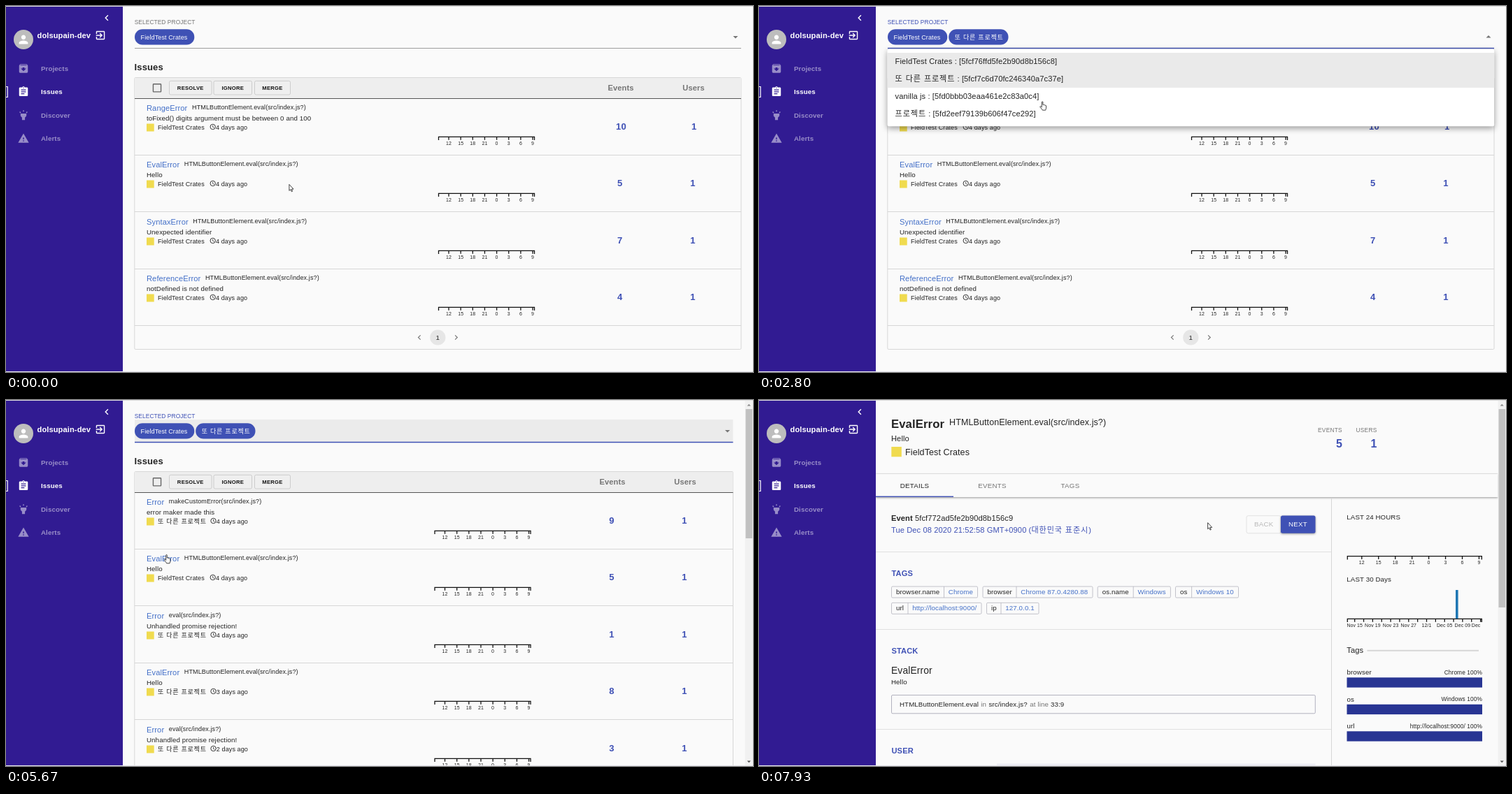
An HTML page that plays this animation: 1068 by 524 pixels, repeating every 8000 ms.

```html
<!DOCTYPE html>
<html lang="ko">
<head>
<meta charset="utf-8">
<title>Issue tracker</title>
<style>
html, body { margin: 0; width: 100%; height: 100%; overflow: hidden; background: #fafafa; }
svg { display: block; width: 1068px; height: 524px; }
text { font-family: "Liberation Sans", "Noto Sans CJK KR", Arial, sans-serif; letter-spacing: .1px; white-space: pre; }
.ko { letter-spacing: .08em; }
.b { font-weight: 700; }
.mid { text-anchor: middle; }
.end { text-anchor: end; }
.caps { letter-spacing: .26px; }
.url { font-family: "Open Sans", "Noto Sans", sans-serif; letter-spacing: 0; }
.bar { filter: drop-shadow(0 1.5px 1.5px rgba(0,0,0,.4)); }
.paper { filter: drop-shadow(0 3px 4px rgba(0,0,0,.38)); }
#menu { transform-origin: 617px 62px; }
</style>
</head>
<body>
<svg viewBox="0 0 1068 524"></svg>
<script>
const LOOP = 8000;
const INK = '#242424', BLUE = '#3f51b5', LINK = '#4470c8', GREY = '#757575', LINE = '#d6d6d6';
const PROJECT = 'FieldTest Crates', OTHER = '또 다른 프로젝트';
const EVAL = 'HTMLButtonElement.eval(src/index.js?)';
// Type sizes of a 1536 px page shown at 1068 px
const S = { tick: 6.95, xs: 8.34, sm: 9.04, md: 9.73, lg: 11.12, xl: 12.52, h3: 13.02, h6: 13.9, h5: 16.69 };

const korean = s => s.replace(/[가-힣][가-힣 ]*[가-힣]/g, m => `<tspan class="ko">${m}</tspan>`);
const text = (x, y, s, size, fill = INK, cls = '') =>
  `<text x="${x}" y="${y}" font-size="${size}" fill="${fill}" class="${cls}">${korean(String(s))}</text>`;
const rect = (x, y, x2, y2, fill, more = '') =>
  `<rect x="${x}" y="${y}" width="${x2 - x}" height="${y2 - y}" fill="${fill}" ${more}/>`;
const frame = (x, y, x2, y2, stroke, fill = 'none', rx = 1.5) =>
  rect(x, y, x2, y2, fill, `stroke="${stroke}" stroke-width=".8" rx="${rx}"`);
const line = (d, stroke = LINE, w = 1, more = '') =>
  `<path d="${d}" stroke="${stroke}" stroke-width="${w}" fill="none" ${more}/>`;
const group = (id, body) => `<g id="${id}">${body}</g>`;
const icon = (cx, cy, d, fill, s = .695) =>
  `<path transform="translate(${cx - 12 * s} ${cy - 12 * s}) scale(${s})" d="${d}" fill="${fill}"/>`;

const ICON = {
  left: 'M15.41 7.41L14 6l-6 6 6 6 1.41-1.41L10.83 12z',
  right: 'M10 6L8.59 7.41 13.17 12l-4.58 4.59L10 18l6-6z',
  down: 'M7 10l5 5 5-5z',
  up: 'M7 14l5-5 5 5z',
  person: 'M12 12c2.21 0 4-1.79 4-4s-1.79-4-4-4-4 1.79-4 4 1.79 4 4 4zm0 2c-2.67 0-8 1.34-8 4v2h16v-2c0-2.66-5.33-4-8-4z',
  exit: 'M10.09 15.59L11.5 17l5-5-5-5-1.41 1.41L12.67 11H3v2h9.67l-2.58 2.59zM19 3H5c-1.11 0-2 .9-2 2v4h2V5h14v14H5v-4H3v4c0 1.1.89 2 2 2h14c1.1 0 2-.9 2-2V5c0-1.1-.9-2-2-2z',
  box: 'M20.5 5.2l-1.4-1.7Q18.7 3 18 3H6q-.7 0-1.2.5L3.5 5.2Q3 5.7 3 6.5V19a2 2 0 0 0 2 2h14a2 2 0 0 0 2-2V6.5q0-.8-.5-1.3zM12 17.5L6.5 12H10v-2h4v2h3.5zM5.1 5l.8-1h12l1 1z',
  task: 'M19 3h-4.18C14.4 1.84 13.3 1 12 1c-1.3 0-2.4.84-2.82 2H5c-1.1 0-2 .9-2 2v14c0 1.1.9 2 2 2h14c1.1 0 2-.9 2-2V5c0-1.1-.9-2-2-2zm-7 0c.55 0 1 .45 1 1s-.45 1-1 1-1-.45-1-1 .45-1 1-1zm2 14H7v-2h7v2zm3-4H7v-2h10v2zm0-4H7V7h10v2z',
  torch: 'M6 14l3 3v5h6v-5l3-3V9H6zm5-12h2v3h-2zM3.5 5.9l1.4-1.4L7 6.6 5.6 8zm13.5.7l2.1-2.1 1.4 1.4L18.4 8z',
  alert: 'M1 21h22L12 2 1 21zm12-3h-2v-2h2v2zm0-4h-2v-4h2v4z',
  check: 'M19 5v14H5V5h14m0-2H5c-1.1 0-2 .9-2 2v14c0 1.1.9 2 2 2h14c1.1 0 2-.9 2-2V5c0-1.1-.9-2-2-2z'
};

function sidebar() {
  const items = [['Projects', 'box'], ['Issues', 'task'], ['Discover', 'torch'], ['Alerts', 'alert']];
  return rect(0, 1, 167, 523, '#311b92') +
    icon(144, 17, ICON.left, '#fff') +
    '<circle cx="25" cy="48" r="14" fill="#bdbdbd"/>' + icon(25, 48, ICON.person, '#fff', .8) +
    text(44.5, 46, 'dolsupain-dev', S.lg, '#fff', 'b') +
    icon(135, 42, ICON.exit, '#fff') +
    items.map(([name, key], i) => {
      const fill = i === 1 ? '#fff' : '#988dc8', y = 89.5 + i * 33.35;
      return icon(25, y, ICON[key], fill) + text(50, y + 3.5, name, S.md, fill, 'b');
    }).join('') +
    line('M0 115.5H2.2V130.5H0', '#fff', 1.2);
}

const chip = (x, s) => rect(x, 33.3, x + 85.3, 55.5, BLUE, 'rx="11.1"') + text(x + 8.6, 47.6, s, S.sm, '#fff');

// Horizontal scale bar with labelled ticks
function axis(x, x2, y, first, step, labels, gap = step) {
  let d = `M${x} ${y + 4.8}V${y}H${x2}V${y + 4.8}`;
  for (let t = first; t < x2; t += gap) d += `M${t} ${y}v4.4`;
  return line(d, '#111', 1.3) +
    labels.map((s, i) => text(first + i * step, y + 11.5, s, S.tick, INK, 'mid')).join('');
}
const HOURS = [12, 15, 18, 21, 0, 3, 6, 9];

function issueRow([name, src, message, project, days, events], i, wide) {
  const shift = wide ? 0 : -5.5;
  const extra = events > 9 ? 1.7 : 0;
  const cx = project === OTHER ? 296.5 : 295.7;
  const body =
    `<text x="201" y="150" font-size="${S.lg}" fill="${LINK}">${name}` +
    `<tspan dx="6.6" dy="-2" font-size="${S.sm}" fill="${INK}">${src}</tspan></text>` +
    text(201, 163.8, message, S.md) +
    rect(201, 168.5, 211.7, 179.5, '#f0db4f') +
    text(217, 177.3, project, S.sm) +
    `<circle cx="${cx}" cy="173" r="3.7" fill="none" stroke="${INK}" stroke-width=".9"/>` +
    line(`M${cx} 170.8V173.3L${cx + 1.8} 174.4`, INK, .8) +
    text(cx + 4.3, 177.3, days + ' days ago', S.sm) +
    axis(618.5 + shift, 755.5 + shift, 187.3, 633 + shift, 17.15, HOURS) +
    text((wide ? 877.7 : 866) + extra, 177.3, events, S.h3, BLUE, 'b mid') +
    text((wide ? 982 : 970) + extra, 177.3, 1, S.h3, BLUE, 'b mid') +
    line(`M184 213.5H${wide ? 1051 : 1039.5}`);
  return `<g transform="translate(0 ${Math.round(i * 81.4)})">${body}</g>`;
}

function issueList(rows, wide, bottom) {
  const x2 = wide ? 1051 : 1039.5;
  const button = (x, to, s) => frame(x, 107.3, to, 127, '#c4c4c4', '#efefef', 2) +
    text((x + to) / 2, 119.9, s, 7.65, '#111', 'b mid caps');
  return text(183.6, 91.6, 'Issues', S.h3, INK, 'b') +
    frame(183.8, 102.5, x2, bottom, '#cfcfcf') +
    rect(184, 103, x2, 132, '#eee') + line(`M184 132.5H${x2}`, '#555') +
    icon(216, 117.3, ICON.check, '#666') +
    button(233.5, 294, 'RESOLVE') + button(297, 351.5, 'IGNORE') + button(355.5, 406.5, 'MERGE') +
    text(wide ? 879 : 867, 121.2, 'Events', S.lg, GREY, 'b mid') +
    text(wide ? 983 : 971, 121.2, 'Users', S.lg, GREY, 'b mid') +
    rows.map((r, i) => issueRow(r, i, wide)).join('');
}

const before = [
  ['RangeError', EVAL, 'toFixed() digits argument must be between 0 and 100', PROJECT, 4, 10],
  ['EvalError', EVAL, 'Hello', PROJECT, 4, 5],
  ['SyntaxError', EVAL, 'Unexpected identifier', PROJECT, 4, 7],
  ['ReferenceError', EVAL, 'notDefined is not defined', PROJECT, 4, 4]
];
const after = [
  ['Error', 'makeCustomError(src/index.js?)', 'error maker made this', OTHER, 4, 9],
  before[1],
  ['Error', 'eval(src/index.js?)', 'Unhandled promise rejection!', OTHER, 4, 1],
  ['EvalError', EVAL, 'Hello', OTHER, 3, 8],
  ['Error', 'eval(src/index.js?)', 'Unhandled promise rejection!', OTHER, 2, 3]
];
const pager = icon(591, 474.5, ICON.left, '#777', .6) +
  '<circle cx="617.3" cy="474.5" r="11.1" fill="#e6e6e6"/>' + text(617.3, 478, 1, S.md, INK, 'mid') +
  icon(643.7, 474.5, ICON.right, '#777', .6);

function menu() {
  const items = [
    [PROJECT, '5fcf76ffd5fe2b90d8b156c8'], [OTHER, '5fcf7c6d70fc246340a7c37e'],
    ['vanilla js', '5fd0bbb03eaa461e2c83a0c4'], ['프로젝트', '5fd2eef79139b606f47ce292']
  ];
  return rect(183.5, 61.8, 1051.2, 172.3, '#fff', 'rx="2.5" class="paper"') +
    rect(183.5, 67, 1051.2, 92, '#eaeaea') +
    group('picked', rect(183.5, 92, 1051.2, 117, '#eaeaea')) +
    items.map(([name, key], i) => text(194.6, 82.8 + i * 25, `${name} : [${key}]`, S.lg)).join('');
}

function tag(x, y, name, split, end, value) {
  return frame(x, y, end, y + 16, '#b4b4be') + line(`M${split} ${y}v16`, '#b4b4be', .8) +
    text(x + 6.5, y + 11, name, S.md) + (value ? text(split + 6.3, y + 11, value, S.md, LINK) : '');
}

function detailHead() {
  const tab = (x, s, fill) => text(x, 125.5, s, S.md, fill, 'mid caps');
  return text(189, 39.8, 'EvalError', S.h5, INK, 'b') + text(272, 35.6, EVAL, S.xl) +
    text(189, 59.4, 'Hello', S.lg) +
    rect(189.3, 67, 203.8, 81.3, '#f0db4f') + text(209, 78.5, PROJECT, S.xl) +
    text(816.5, 45.6, 'EVENTS', S.xs, GREY, 'mid caps') + text(868.5, 45.6, 'USERS', S.xs, GREY, 'mid caps') +
    text(829.5, 67.7, 5, 16, BLUE, 'b mid') + text(879, 67.7, 1, 16, BLUE, 'b mid') +
    line('M167 105.5H1056', '#ebebeb') + rect(167, 106, 1056.5, 139, '#fafafa', 'class="bar"') +
    rect(167, 137.6, 278, 139, BLUE) +
    tab(222.5, 'DETAILS', INK) + tab(333.5, 'EVENTS', GREY) + tab(445, 'TAGS', GREY);
}

// Parts both detail states share; right edge of the main column is `edge`
function detailFrame(edge, splits, heads) {
  const x = edge - 121;
  return line(`M${edge}.5 140V524`) + splits.map(y => line(`M167 ${y}H${edge}`, '#e0e0e0')).join('') +
    text(189, 173.4, 'Event', S.lg, INK, 'b') +
    frame(x, 165.7, x + 49, 190.8, '#dcdcdc', 'none', 2.5) + text(x + 24.7, 181.3, 'BACK', S.md, '#b8b8b8', 'mid caps') +
    rect(x + 49, 165.5, x + 98.5, 190.8, BLUE, 'rx="2.5" class="bar"') + text(x + 73.5, 181.3, 'NEXT', S.md, '#fff', 'mid caps') +
    ['TAGS', 'STACK', 'USER'].map((s, i) => text(189.5, heads[i], s, S.lg, BLUE, 'b')).join('') +
    text(edge + 22.3, 171.3, 'LAST 24 HOURS', S.md) + text(edge + 22.3, 260, 'LAST 30 Days', S.md) +
    text(edge + 22.3, 362, 'Tags', S.lg) + line(`M${edge + 51.5} 358.7H1029`, '#d6d6d6', 2);
}

function detailEmpty() {
  const tags = [[189.5, 'browser.name', 264.5, 277.3], [284.5, 'browser', 333, 345.8], [353.2, 'os.name', 404, 416.3],
    [424, 'os', 447.5, 460.3], [467.5, 'url', 491.5, 504.3], [511.5, 'ip', 532.5, 545]];
  return detailFrame(778, [217.5, 305.5, 415, 503], [251.6, 339.4, 448.9]) +
    text(189, 190, 'Invalid Date', S.lg, BLUE) +
    tags.map(([x, s, split, end]) => tag(x, 267, s, split, end)).join('') +
    frame(189.5, 366, 755.2, 392.2, '#a0a0a0') +
    text(204.3, 382.5, 'in', S.md, GREY) + text(218.7, 382.5, 'at line', S.md, GREY) + text(248.7, 382.5, ':', S.md) +
    text(189, 476, 'IP Address', S.lg) + rect(330, 464, 755.5, 471, '#eeeef5');
}

function detailFull() {
  const share = (y, name, value) => text(840.5, y - 4, name, S.md) +
    text(1034, y - 4.8, value + ' 100%', S.xs, INK, 'end') + rect(840.5, y, 1034, y + 14.3, '#283593');
  return detailFrame(818, [217.5, 328.5, 471.5], [251.6, 362.8, 505.5]) +
    text(223, 173.4, '5fcf772ad5fe2b90d8b156c9', S.lg) +
    text(189, 190, 'Tue Dec 08 2020 21:52:58 GMT+0900 (대한민국 표준시)', S.lg, BLUE) +
    tag(189.5, 267, 'browser.name', 264.5, 312.5, 'Chrome') + tag(320, 267, 'browser', 368, 477, 'Chrome 87.0.4280.88') +
    tag(484.2, 267, 'os.name', 535.2, 588.4, 'Windows') + tag(595.5, 267, 'os', 618.6, 685.5, 'Windows 10') +
    tag(189.5, 290.3, 'url', 213, 318, 'http://localhost:9000/') + tag(325.5, 290.3, 'ip', 346, 400, '127.0.0.1') +
    text(189, 392, 'EvalError', S.h6) + text(189, 407.3, 'Hello', S.md) +
    frame(189.5, 422.5, 795.3, 448.8, '#a0a0b0') +
    text(201, 439, 'HTMLButtonElement.eval', S.md) + text(317.3, 439, 'in', S.md, GREY) +
    text(328.5, 439, 'src/index.js?', S.md) + text(387.3, 439, 'at line', S.md, GREY) + text(417, 439, '33:9', S.md) +
    rect(340, 520.5, 795.5, 524, '#eeeef5') +
    axis(841.3, 1033.3, 223.7, 861.8, 23.95, HOURS) +
    axis(841.3, 1033.3, 313.3, 851.7, 25.7, ['Nov 15', 'Nov 19', 'Nov 23', 'Nov 27', '12/1', 'Dec 05', 'Dec 09'], 12.85) +
    text(1018.8, 324.8, 'Dec', S.tick) + rect(996, 272, 999.6, 313, '#1f77b4') +
    share(397.3, 'browser', 'Chrome') + share(435.8, 'os', 'Windows') + share(474.3, 'url', 'http://localhost:9000/');
}

const ARROW = 'M.4 .4V9.4L2.4 7.6 3.8 10.8 5.1 10.2 3.8 7.1H6.5Z';
const HAND = 'M3.2 7.2V1.4Q3.2 .5 4 .5T4.8 1.4V5Q6.2 4.6 6.5 5.4 7.7 5 8 5.9 9.4 5.6 9.4 6.8V9.5Q9.2 11 8.5 12.8H4.2Q3.5 11.2 .8 8.4 .4 7.4 1.2 7.1 2 7 3.2 8.4Z';
const shape = (id, d) => `<path id="${id}" d="${d}" fill="#fff" stroke="#222" stroke-width=".85" stroke-linejoin="round"/>`;

document.querySelector('svg').innerHTML =
  rect(0, 0, 1068, 524, '#fafafa') +
  group('select',
    rect(184, 28, 1039.5, 60, '#ebebeb', 'id="focus"') +
    text(183.7, 25.6, 'SELECTED PROJECT', S.xs, GREY).replace('<text', '<text id="label"') +
    chip(184, PROJECT) + group('chip2', chip(271.2, OTHER)) +
    group('arrows', group('closed', icon(1043, 44.5, ICON.down, GREY)) + group('opened', icon(1043, 44, ICON.up, GREY))) +
    line('', GREY, 1, 'id="underline"')) +
  group('listA', issueList(before, true, 491.5) + pager) +
  group('listWide', issueList(after, true, 600)) +
  group('listNarrow', issueList(after, false, 600)) +
  group('detail', detailHead() + group('empty', detailEmpty()) + group('full', detailFull())) +
  group('menu', menu()) +
  sidebar() +
  group('scroll', rect(1056.7, 1, 1068, 523, '#f1f1f1') + rect(1057.5, 13, 1067, 198, '#c1c1c1', 'id="thumb"') +
    '<path d="M1059.6 8.6L1062.2 5.8 1064.8 8.6Z" fill="#8a8a8a"/><path d="M1059.6 516.4L1062.2 519.2 1064.8 516.4Z" fill="#505050"/>') +
  rect(0, 0, 1068, 1, '#dedede') + rect(0, 523, 1068, 524, '#e8e8ee') +
  group('status', '<path d="M0 508.5H352.5Q355 508.5 355 511V524H0Z" fill="#000"/>' +
    text(3, 519.2, 'panopticon-dev.gq/issue/5fcf772a17a95f43cef57bd9', 8.1, '#fff', 'url')) +
  group('cursor', shape('arrow', ARROW) + shape('hand', HAND));

const $ = id => document.getElementById(id);
const show = (id, on) => { $(id).style.display = on ? '' : 'none'; };

// time, x, y, pointing hand
const path = [
  [0, 404.5, 255, 0], [70, 404.5, 255, 0], [130, 404.2, 240, 0], [470, 404.2, 240, 0], [780, 372, 120, 0],
  [960, 354, 58, 1], [1070, 351, 47, 1], [1330, 351, 47, 1], [1500, 352, 60, 0], [1600, 352.3, 65, 0],
  [1730, 365, 75, 1], [2000, 397, 99, 1], [2400, 397, 99, 1], [2800, 401, 136, 1], [2930, 420, 180, 0],
  [3070, 450, 222, 0], [3450, 480, 236, 0], [3930, 531, 176, 0], [4000, 531, 176, 0], [4130, 503.3, 162, 0],
  [4500, 330, 152, 0], [4800, 203, 147, 1], [5050, 206, 142, 1], [5200, 212, 165, 0], [5500, 222, 214, 1],
  [5670, 225.5, 221, 1], [6540, 226.5, 221, 0], [6670, 235, 218, 0], [6900, 270, 180, 0], [7200, 301, 150, 0],
  [7400, 301, 150, 0], [7600, 420, 143, 0], [7800, 590, 163, 0], [7930, 641.2, 175.3, 0], [LOOP, 641.2, 175.3, 0]
];

const within = (t, a, b) => t >= a && t < b;
const ramp = (t, a, b) => Math.min(1, Math.max(0, (t - a) / (b - a)));

function draw(t) {
  const open = within(t, 1340, 3370), narrow = t >= 3370, detail = t >= 6540, full = t >= 6900;

  show('select', !detail);
  show('listA', t < 2880);
  show('listWide', within(t, 2880, 3370));
  show('listNarrow', narrow && !detail);
  show('detail', detail);
  show('empty', !full);
  show('full', full);
  show('scroll', narrow);
  $('thumb').setAttribute('height', (full ? 297 : detail ? 326 : 198) - 13);

  const focused = within(t, 1340, 6000), hover = within(t, 950, 1340);
  const right = narrow ? 1039.5 : 1051;
  show('focus', focused && narrow);
  show('chip2', t >= 2340);
  show('closed', !open);
  show('opened', open);
  $('arrows').setAttribute('transform', `translate(${right - 1051} 0)`);
  $('label').setAttribute('fill', focused ? BLUE : GREY);
  const rule = $('underline');
  rule.setAttribute('d', `M184 60.5H${right}`);
  rule.setAttribute('stroke', focused ? BLUE : hover ? '#222' : '#949494');
  rule.setAttribute('stroke-width', focused || hover ? 1.5 : .9);

  // The menu grows in quickly and fades when dismissed
  const grow = 1 - (1 - ramp(t, 1340, 1570)) ** 3;
  const fade = 1 - ramp(t, 3300, 3480);
  show('menu', within(t, 1340, 3480));
  show('picked', t >= 2340);
  $('menu').style.opacity = grow * fade;
  $('menu').style.transform = grow < 1 ? `scale(${.75 + .25 * grow}, ${.5625 + .4375 * grow})` : 'none';

  show('status', within(t, 5800, 6900));
  $('status').style.opacity = ramp(t, 5800, 5880) * (1 - ramp(t, 6780, 6900));

  const i = path.findIndex((p, n) => t < path[n + 1][0]);
  const [a, x, y, hand] = path[i], [b, x2, y2] = path[i + 1];
  const k = ramp(t, a, b);
  $('cursor').setAttribute('transform', `translate(${x + (x2 - x) * k} ${y + (y2 - y) * k})`);
  show('hand', hand);
  show('arrow', !hand);
}

function tick() {
  draw(performance.now() % LOOP);
  requestAnimationFrame(tick);
}
tick();
</script>
</body>
</html>
```
